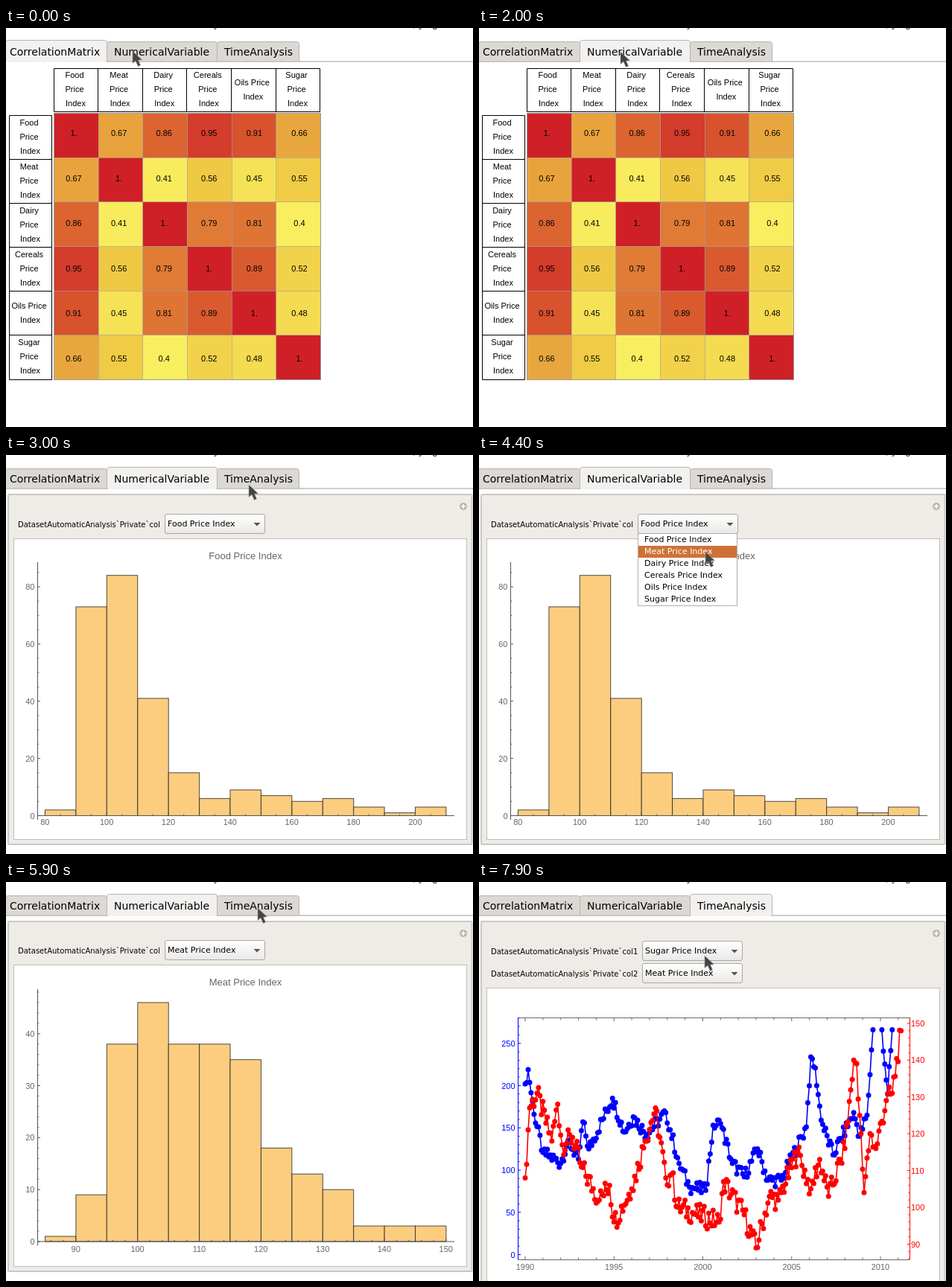
An HTML page for the animation above (8 s loop, 627x536 px).

```html
<!DOCTYPE html>
<html lang="en">
<head>
<meta charset="utf-8">
<title>Dataset analysis</title>
<style>
html, body { margin: 0; width: 100%; height: 100%; overflow: hidden; background: #fff; }
svg { display: block; }
text { font-family: "Liberation Sans", Arial, sans-serif; font-size: 11px; white-space: pre; }
.ui { font-family: "DejaVu Sans", sans-serif; }
</style>
</head>
<body>
<svg id="stage" width="627" height="536" viewBox="0 0 627 536">
  <defs>
    <linearGradient id="button" x2="0" y2="1">
      <stop stop-color="#fff"/><stop offset="1" stop-color="#ebe9e7"/>
    </linearGradient>
  </defs>
</svg>
<script>
const stage = document.getElementById('stage');
const names = ['Food', 'Meat', 'Dairy', 'Cereals', 'Oils', 'Sugar'].map(n => n + ' Price Index');
const GRAY = '#666';

const rect = (x, y, w, h, fill, stroke = 'none', extra = '') =>
  `<rect x="${x}" y="${y}" width="${w}" height="${h}" fill="${fill}" stroke="${stroke}" ${extra}/>`;
const path = (d, stroke, fill = 'none', extra = '') =>
  `<path d="${d}" stroke="${stroke}" fill="${fill}" ${extra}/>`;
const text = (x, y, s, { size = 11, fill = '#000', anchor = 'start', ui = false } = {}) =>
  `<text x="${x}" y="${y}" fill="${fill}" text-anchor="${anchor}" style="font-size:${size}px"${ui ? ' class="ui"' : ''}>${s}</text>`;
const mid = (x, y, s, o) => text(x, y, s, { anchor: 'middle', ...o });
const range = (a, b, step = 1) => Array.from({ length: Math.floor((b - a) / step + 1e-6) + 1 }, (_, i) => a + i * step);

function group(html) {
  const g = document.createElementNS('http://www.w3.org/2000/svg', 'g');
  g.innerHTML = html;
  stage.append(g);
  return g;
}

// Linear interpolation through [position, ...values] stops
function along(stops, at) {
  const i = Math.max(1, stops.findIndex(s => s[0] >= at)), [p, ...a] = stops[i - 1], [q, ...b] = stops[i];
  return a.map((v, k) => v + (b[k] - v) * (at - p) / (q - p));
}

// Tabs
const tabs = [['CorrelationMatrix', 0, 136, 5], ['NumericalVariable', 136, 284, 145], ['TimeAnalysis', 284, 394, 293]];

function tabBar(active) {
  const tab = ([label, x0, x1, tx], i) => {
    const on = i === active, top = on ? 16.5 : 18.5, l = x0 - .5, r = x1 - .5;
    return path(`M${l} 46V${top + 3}q0 -3 3 -3H${r - 3}q3 0 3 3V46`, '#b7b3ae', on ? '#f3f1ef' : '#dcd9d4') +
      (on ? '' : rect(x0 - 1, 44, x1 - x0 + 1, 2, '#c9c7c5')) + text(tx, 37, label, { size: 14, ui: true });
  };
  const order = [0, 1, 2].filter(i => i !== active).concat(active);
  return rect(0, 44, 627, 2, '#d0cecc') + order.map(i => tab(tabs[i], i)).join('');
}

// Correlation matrix, upper triangle
const corr = [[1, .67, .86, .95, .91, .66], [1, .41, .56, .45, .55], [1, .79, .81, .4], [1, .89, .52], [1, .48], [1]];
const ramp = [[.4, 249, 238, 96], [.55, 240, 203, 69], [.9, 216, 87, 46], [1, 208, 32, 39]];

function matrix() {
  const cell = 59.65;
  const heading = (name, x, y) => {
    const lines = name.startsWith('Oils') ? ['Oils Price', 'Index'] : name.split(' ');
    const first = y - (lines.length - 1) * 9.5;
    return lines.map((s, k) => mid(x + (s === 'Index' ? 0 : -1.5), first + k * 19, s)).join('');
  };
  let s = '', grid = '', frame = 'M64.5 54.5H421.5V112.5H64.5ZM4.5 117.5H61.5V472.5H4.5Z';
  for (let i = 0; i < 6; i++) {
    for (let j = 0; j < 6; j++) {
      const v = corr[Math.min(i, j)][Math.abs(i - j)];
      s += rect(64.5 + j * cell, 114.5 + i * cell, cell, cell, `rgb(${along(ramp, v).map(Math.round)})`) +
        mid(91 + j * 60.6, 145 + i * 60.6, v === 1 ? '1.' : v);
    }
    s += heading(names[i], 93.5 + i * 59.6, 86) + heading(names[i], 32.5, 150 + i * 59);
    if (i) {
      const p = Math.round(i * cell);
      grid += `M${64.5 + p} 114V472M64 ${114.5 + p}H422`;
      frame += `M${64.5 + Math.floor(i * 59.6)} 54V112M4 ${117.5 + i * 59}H61`;
    }
  }
  return s + path(grid, '#999', 'none', 'opacity=".6"') + rect(64.5, 114.5, 358, 358, 'none', '#999') + path(frame, '#000');
}

// Panels and controls
const panel = (top, bottom) => rect(3, 53, 622.5, bottom - 53, '#efece7', '#c9c9c9', 'stroke-width="2" rx="1"') +
  rect(10.5, top + .5, 608, bottom - 7 - top, '#fff', '#bfbdba') +
  '<circle cx="614" cy="69" r="5" fill="#b9b6b2"/>' + path('M611 69H617M614 66V72', '#fff', 'none', 'stroke-width="1.6"');

const control = (x, y, label, value) => text(16, y + 16.5, label, { size: 10, ui: true }) +
  rect(x + .5, y - .5, 134, 26, 'url(#button)', '#aaa7a3', 'rx="2.5"') +
  text(x + 4, y + 16, value, { ui: true }) + path(`M${x + 119.5} ${y + 11}h9l-4.5 4.5z`, 'none', '#555');

const colName = 'DatasetAutomaticAnalysis`Private`col';

function histogram(o) {
  const bin = 41.42, px = v => 52.3 + (v - o.start) / o.width * bin, py = v => o.base - v * o.unit;
  let s = panel(o.top, 523) + control(213, o.top - 32, colName, o.name) +
    mid(321.5, o.top + 28, o.name, { size: 13, fill: GRAY });
  o.counts.forEach((n, i) => {
    s += rect((52.5 + i * bin).toFixed(1), py(n), bin, n * o.unit, '#fccd7f', '#222', 'stroke-opacity=".8"');
  });
  let axes = `M42 ${o.base}H602M42.5 144V${o.base + 5.5}`;
  for (const v of range(0, o.maxY, o.minorY)) axes += `M42 ${py(v)}h${v % o.stepY ? 2 : 4}`;
  for (const v of range(Math.ceil(o.start / o.minorX) * o.minorX, o.start + 13 * o.width, o.minorX))
    axes += `M${px(v)} ${o.base}v${v % o.stepX ? -2 : -4}`;
  s += path(axes, '#555');
  for (const v of range(0, o.maxY, o.stepY)) s += text(38.5, py(v) + 4, v, { fill: GRAY, anchor: 'end' });
  for (const v of range(o.firstX, o.lastX, o.stepX)) s += mid(px(v), 497, v, { fill: GRAY });
  return s;
}

const food = histogram({ name: names[0], top: 112, base: 484.5, unit: 3.843, start: 80, width: 10,
  counts: [2, 73, 84, 41, 15, 6, 9, 7, 5, 6, 3, 1, 3], maxY: 85, stepY: 20, minorY: 5,
  stepX: 20, minorX: 5, firstX: 80, lastX: 200 });
const meat = histogram({ name: names[1], top: 111, base: 483, unit: 6.98, start: 85, width: 5,
  counts: [1, 9, 38, 46, 38, 38, 35, 18, 13, 10, 3, 3, 3], maxY: 48, stepY: 10, minorY: 2,
  stepX: 10, minorX: 2, firstX: 90, lastX: 150 });

// Time series: turning points as [months since 1990, index], with seeded noise between them
const sugar = [[0, 202], [2, 219], [6, 166], [12, 121], [24, 108], [29, 135], [36, 113], [39, 157], [43, 125],
  [59, 185], [67, 145], [73, 163], [82, 142], [95, 168], [104, 108], [111, 80], [122, 76], [127, 153], [132, 155],
  [140, 108], [148, 92], [157, 125], [164, 88], [173, 88], [190, 151], [193, 234], [196, 221], [200, 159],
  [208, 118], [222, 168], [226, 140], [231, 165], [235, 266]];
const sugarEnd = [[241, 266], [245, 190], [248, 266]];
const meatTrend = [[0, 108], [3, 127], [8, 131], [18, 118], [22, 128], [25, 117], [32, 119], [38, 111], [50, 102],
  [57, 106], [60, 96], [72, 105], [81, 118], [88, 127], [95, 108], [99, 109], [103, 100], [131, 96], [134, 107],
  [148, 98], [156, 89], [165, 103], [171, 102], [184, 115], [193, 105], [199, 113], [205, 103], [216, 116],
  [222, 140], [224, 139], [229, 104], [233, 120], [237, 116], [244, 129], [248, 131], [254, 148]];

const noise = i => { const v = Math.sin(i * 12.9898) * 43758.5453; return (v - Math.floor(v)) * 2 - 1; };

function series(stops, color, y, swing) {
  const turns = new Set(stops.map(s => s[0]));
  const pts = range(stops[0][0], stops.at(-1)[0]).map(m => {
    const v = along(stops, m)[0] + (turns.has(m) ? 0 : noise(m + 1) * swing);
    return [(62 + m * 1.987).toFixed(1), y(v).toFixed(1)];
  });
  return path('M' + pts.join('L'), color, 'none', 'stroke-width="1.6"') +
    path(pts.map(p => `M${p}h0`).join(''), color, 'none', 'stroke-width="7" stroke-linecap="round"');
}

function timeChart() {
  const blue = '#00f', red = '#f00';
  const yl = v => 500.5 - v * 1.135, yr = v => 486.5 - (v - 90) * 4.945, xt = v => 62 + (v - 1990) * 23.85;
  let left = 'M52.5 182V507', right = 'M578.5 182V507', ends = 'M52 182.5H578M52 507.5H578', labels = '';
  for (const v of range(0, 280, 10)) left += `M52 ${yl(v)}h${v % 50 ? 2.5 : 4}`;
  for (const v of range(86, 150, 2)) right += `M579 ${yr(v)}h${v % 10 ? -2.5 : -4}`;
  for (const v of range(1990, 2011)) {
    const n = v % 5 ? 2.5 : 4;
    ends += `M${xt(v)} 183v${n}M${xt(v)} 507v${-n}`;
  }
  for (const v of range(0, 250, 50)) labels += text(48.5, yl(v) + 4, v, { fill: blue, anchor: 'end' });
  for (const v of range(90, 150, 10)) labels += text(580, yr(v) + 4, v, { fill: red });
  for (const v of range(1990, 2010, 5)) labels += mid(xt(v), 521, v, { fill: GRAY });
  return panel(142, 600) + control(219, 80, colName + 1, names[5]) + control(219, 110, colName + 2, names[1]) +
    path(ends, GRAY) + path(left, blue) + path(right, red) + labels +
    series(sugar, blue, yl, 8) + series(sugarEnd, blue, yl, 8) + series(meatTrend, red, yr, 3);
}

const menu = chosen => rect(213.5, 105.5, 133, 97, '#fff', '#b0aeab') +
  rect(214, 122 + (chosen - 1) * 16, 132, 16, '#cf7137') +
  names.map((n, i) => text(222, 117 + i * 16, n, { ui: true, fill: i === chosen ? '#fff' : '#000' })).join('');

// Descenders of the text line cut off by the top edge
group([[279, 'y'], [546, ','], [554, 'y'], [572, 'g']].map(([x, s]) => text(x, -1, s, { size: 14, fill: '#333' })).join(''));

// Layers with the times at which they appear and vanish
const layers = [
  [0, 2100, matrix()], [2100, 4700, food], [4700, 6800, meat], [6800, 8000, timeChart()],
  [0, 2000, tabBar(0)], [2000, 6700, tabBar(1)], [6700, 8000, tabBar(2)],
  [4100, 4300, menu(0)], [4300, 4500, menu(1)],
].map(([from, to, html]) => ({ from, to, node: group(html) }));

const cursor = group(path('M0 0V16.5L4 13.2 7.3 20.5 10.6 19 7.6 12.2 12.5 11.8Z', '#aaa', '#444', 'stroke-width=".6"'));

// Pointer moves: start, end, x, y; it rests in between
const moves = [[0, 700, 187, 32], [800, 1200, 190, 32], [2000, 2800, 303, 42], [2800, 3000, 326, 40],
  [3300, 3800, 322, 89], [4000, 4400, 304, 130], [4600, 5500, 336, 39], [5500, 5900, 338, 35],
  [6900, 7000, 337, 34], [7200, 7900, 303, 99]];

function pointer(t) {
  let x = 170, y = 31;
  for (const [from, to, toX, toY] of moves) {
    const u = Math.min(1, Math.max(0, (t - from) / (to - from))), k = u * u * (3 - 2 * u);
    x += (toX - x) * k;
    y += (toY - y) * k;
  }
  return [Math.round(x), Math.round(y)];
}

const start = performance.now();
function draw() {
  const t = Math.floor((performance.now() - start) % 8000 / 100) * 100;
  for (const { from, to, node } of layers) node.style.display = t >= from && t < to ? '' : 'none';
  cursor.setAttribute('transform', `translate(${pointer(t)})`);
  requestAnimationFrame(draw);
}
draw();
</script>
</body>
</html>
```
